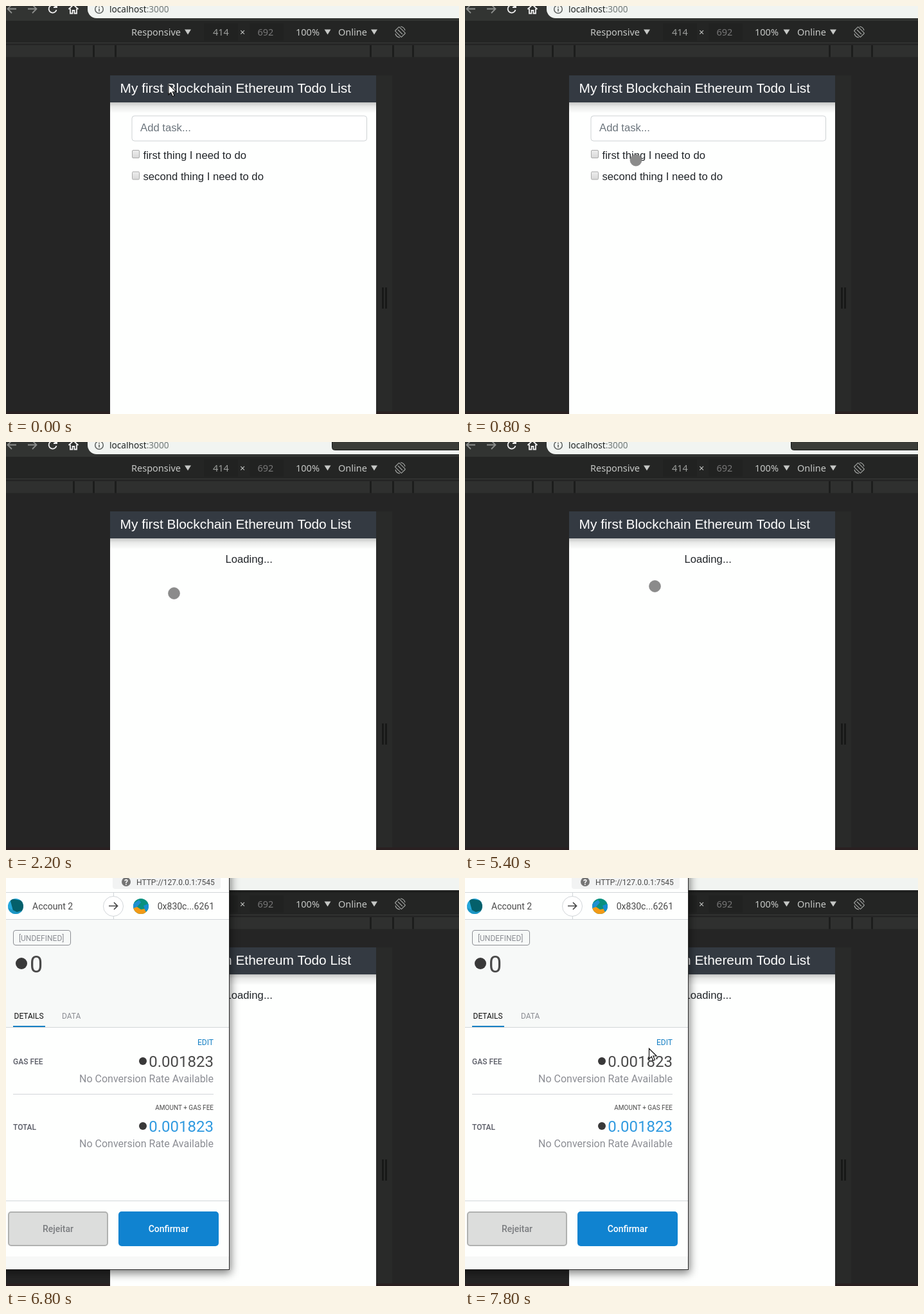
Recreate the animation shown at these times as an HTML page. Size 705 px wide and 635 px high, loop 8 s.

```html
<!DOCTYPE html>
<html lang="en">
<head>
<meta charset="utf-8">
<title>Todo list</title>
<style>
  html, body { margin: 0; width: 100%; height: 100%; overflow: hidden; background: #252525; }
  svg { display: block; }
  .page { font: 16.7px "Liberation Sans", Arial, sans-serif; fill: #212529; }
  .tools { font: 14.5px "Noto Sans", "Open Sans", sans-serif; fill: #c6c8c6; }
  .wallet { font: 12px Roboto, sans-serif; fill: #4a4a4a; }
  .wallet .end { text-anchor: end; }
  .medium { font-weight: 500; }
  .sum { font-size: 24px; }
  .note { font-size: 16px; fill: #8c8e94; }
  .line { fill: none; stroke: #d2d6d9; }
</style>
</head>
<body>
<svg width="705" height="635" viewBox="0 0 705 635">
  <defs>
    <linearGradient id="shade" x2="0" y2="1">
      <stop stop-color="#000" stop-opacity=".22"/>
      <stop offset=".4" stop-color="#000" stop-opacity=".08"/>
      <stop offset="1" stop-color="#000" stop-opacity="0"/>
    </linearGradient>
    <linearGradient id="box" x2="0" y2="1">
      <stop stop-color="#eee"/><stop offset="1" stop-color="#d8d8d8"/>
    </linearGradient>
    <filter id="blur" x="-20%" y="-20%" width="140%" height="140%"><feGaussianBlur stdDeviation="7"/></filter>
    <clipPath id="face"><circle r="12"/></clipPath>
    <rect id="check" x=".5" y=".5" width="11" height="12" rx="1.5" fill="url(#box)" stroke="#aaa"/>
    <path id="down" d="M0 0h10l-5 8z" fill="#c6c8c6"/>
  </defs>

  <!-- browser bar -->
  <rect width="705" height="23" fill="#323432"/>
  <path d="M705 19H141a14 14 0 0 1-14-14V0H705z" fill="#f1f4f1"/>
  <g fill="none" stroke-width="1.8">
    <path d="M16 4.5H3M9-2L2.5 4.5 9 11M34 4.5H47M41-2l6.500 6.500L41 11" stroke="#8b8d8b"/>
    <path d="M77.500 1A6 6 0 1 0 78.500 6M79-3v5h-5" stroke="#f2f2f2"/>
    <path d="M97.500 5L105-2l7.500 7M100 4v7.500h3.500V7h3v4.500h3.500V4" stroke="#f2f2f2"/>
    <circle cx="145" cy="5" r="6.300" stroke="#5b5f5d" stroke-width="1.500"/>
    <path d="M145 4v4.500M145 1v1.700" stroke="#5b5f5d" stroke-width="1.600"/>
  </g>
  <text class="tools" x="161" y="10" style="font-size:13.650px;fill:#202422">localhost<tspan fill="#747b78">:3000</tspan></text>

  <!-- device toolbar -->
  <rect y="23" width="705" height="35" fill="#242524"/>
  <path d="M308 27h53v27h-53zM379 27h53v27h-53z" fill="#212221"/>
  <path d="M0 57.500H705" stroke="#3a3b3a"/>
  <g class="tools">
    <text x="195" y="46">Responsive</text>
    <text x="322" y="46" fill="#9a9c9a">414</text>
    <text x="364" y="46">×</text>
    <text x="391.500" y="46" style="fill:#777">692</text>
    <text x="451" y="46">100%</text>
    <text x="517" y="46">Online</text>
  </g>
  <use href="#down" x="278" y="36.500"/><use href="#down" x="495.500" y="36.500"/><use href="#down" x="568" y="36.500"/>
  <g fill="none" stroke="#a2a4a2" stroke-width="1.200">
    <rect x="-4.500" y="-7" width="9" height="14" rx="1" transform="translate(613.500 40.500) rotate(-45)"/>
    <path d="M606 43a8 8 0 0 0 7 6M621 38a8 8 0 0 0-7-6M610 37l7 7"/>
  </g>
  <rect y="61" width="705" height="18.500" fill="#2f302f"/>
  <path d="M105.500 61v18.500m31-18.500v18.500m34-18.500v18.500m397-18.500v18.500m35-18.500v18.500m31-18.500v18.500" stroke="#1c1d1c" stroke-width="3"/>
  <rect x="576" y="108" width="25" height="527" fill="#292a29"/>
  <path d="M586.500 438v33m5-33v33" stroke="#151615" stroke-width="2.500"/>
  <path d="M0 633H705" stroke="#2a2021" stroke-width="4"/>

  <!-- web page -->
  <rect x="162" y="108" width="414" height="527" fill="#fefffe"/>
  <rect x="162" y="150" width="414" height="17" fill="url(#shade)"/>
  <rect x="162" y="108" width="414" height="42" fill="#343a42"/>
  <g class="page">
    <text x="177.500" y="135" style="font-size:20.900px;fill:#fff">My first Blockchain Ethereum Todo List</text>
    <g id="todos">
      <rect x="196" y="171" width="365.500" height="39" rx="4" fill="#fff" stroke="#ced2d4"/>
      <text x="209" y="195" fill="#6c757d">Add task...</text>
      <use href="#check" x="196" y="224"/><text x="213.500" y="238">first thing I need to do</text>
      <use href="#check" x="196" y="257.500"/><text x="213.500" y="271">second thing I need to do</text>
    </g>
    <text id="loading" x="341.500" y="188">Loading...</text>
  </g>

  <path id="opening" d="M705 12.500H511.500a4 4 0 0 1-4-4V-2H705z" fill="#3b3c37" stroke="#151615"/>

  <!-- wallet window -->
  <g id="wallet" class="wallet">
    <rect x="348" y="19" width="357" height="4" fill="#1f201f"/>
    <rect x="-20" y="-20" width="370" height="635" fill="#000" opacity=".5" filter="url(#blur)"/>
    <rect x="-1" y="-1" width="348.500" height="610.500" fill="#fefffe" stroke="#2a2a2a"/>
    <path d="M166-1h168v14a4 4 0 0 1-4 4H170a4 4 0 0 1-4-4z" fill="#f2f3f3"/>
    <circle cx="187" cy="6" r="7" fill="#757575"/>
    <text x="187" y="10.500" text-anchor="middle" style="font-weight:700;fill:#fff">?</text>
    <text x="203" y="11">HTTP://127.0.0.1:7545</text>
    <rect y="65" width="347" height="168" fill="#f7f9f8"/>
    <rect y="589" width="347" height="20" fill="#f7f8f7"/>
    <path class="line" d="M0 22.500H347M0 64.500H347M0 232.500H347M11 336.500H323M0 502.500H347M167.500 22V65"/>
    <circle cx="167" cy="44" r="15.500" fill="#fff" stroke="#d2d6d9"/>
    <path d="M160 43.500h13.500m-5.500-5.500l5.500 5.500-5.500 5.500" fill="none" stroke="#444" stroke-width="1.700"/>
    <g transform="translate(15 44)"><g clip-path="url(#face)">
      <rect x="-12" y="-12" width="24" height="24" fill="#25a8dc"/>
      <path d="M-9-12L15-8V8L2 10-4 7z" fill="#04606b"/>
      <path d="M-12 2L2 9l7-2v6h-21z" fill="#1c96c4"/>
    </g></g>
    <g transform="translate(210 44)"><g clip-path="url(#face)">
      <rect x="-12" y="-12" width="24" height="24" fill="#07907f"/>
      <path d="M-12-4l9-6 3 4-7 8-5 2z" fill="#1f8fd2"/>
      <path d="M-12 3L-6 1l6 4 6-1 4 9h-22z" fill="#f29a16"/>
      <path d="M4-1l8-3v9l-5 3z" fill="#168cd0"/>
    </g></g>
    <text x="41" y="49" style="font-size:14px">Account 2</text>
    <text class="end" x="324" y="49" style="font-size:14px">0x830c...6261</text>

    <rect x="11.500" y="81.500" width="89" height="23" rx="3.500" fill="none" stroke="#8c8e94"/>
    <text x="20" y="98" fill="#8c8e94">[UNDEFINED]</text>
    <g fill="#393939">
      <circle cx="24" cy="133" r="9"/><circle cx="213" cy="285" r="6"/><circle cx="213" cy="386" r="6"/>
    </g>
    <text x="37" y="147" style="font-size:36px">0</text>
    <text x="12.500" y="219" fill="#111">DETAILS</text>
    <text x="87" y="219" fill="#8c8e94">DATA</text>
    <rect x="11" y="230" width="50" height="2" fill="#1680c4"/>

    <text class="end" x="323" y="260" fill="#1680c4">EDIT</text>
    <text class="medium" x="11" y="290" fill="#5b5d67">GAS FEE</text>
    <text class="end sum" x="323" y="294">0.001823</text>
    <text class="end note" x="323" y="318">No Conversion Rate Available</text>
    <text class="end" x="323" y="361" style="font-size:10px">AMOUNT + GAS FEE</text>
    <text class="medium" x="11" y="392" fill="#5b5d67">TOTAL</text>
    <text class="end sum" x="323" y="395" fill="#2f9ae0">0.001823</text>
    <text class="end note" x="323" y="419">No Conversion Rate Available</text>

    <rect x="4" y="520" width="154" height="52" rx="4" fill="#dcdddc" stroke="#b0b1b0" stroke-width="2"/>
    <rect x="175" y="519" width="156" height="54" rx="5" fill="#1083d0"/>
    <g class="medium" text-anchor="middle" style="font-size:14px">
      <text x="81" y="551" fill="#7b7d80">Rejeitar</text>
      <text x="253" y="551" fill="#fff">Confirmar</text>
    </g>
  </g>

  <circle id="touch" r="9" fill="#8b8b8b" stroke="#7d7d7d" stroke-width=".6"/>
  <path id="arrow" d="M.5.5v16l3.700-3.500 2.600 6.200 2.700-1.200-2.600-6h5.200z" fill="#fff" stroke="#111" stroke-width="1.200"/>
</svg>
<script>
  const LOOP = 8000, STEP = 100;

  // Pointer stops: [time, shape, x, y]; each holds until the next.
  const pointer = [
    [0, "arrow", 252.5, 121.5],
    [100, "touch", 256, 165], [200, "touch", 270, 215], [300, "touch", 283, 245],
    [400, "touch", 275, 259], [500, "touch", 255, 255], [600, "touch", 241, 245],
    [700, "touch", 252, 240], [800, "touch", 266, 240], [900, "touch", 257, 237],
    [1000, "touch", 249, 240], [1200, "touch", 263, 234], [1300, "touch", 261.5, 235.5],
    [5400, "touch", 295.5, 224.5], [5500, "touch", 303, 222],
    [5600, "touch", 305, 224], [5700, "touch", 304.5, 225.5],
    [6000, "touch", 400, 175], [6100, "arrow", 667, 35], [6200, "none"],
    [7300, "arrow", 655, 37], [7400, "touch", 555, 115], [7500, "touch", 430, 205],
    [7600, "arrow", 325, 255], [7700, "arrow", 290, 272], [7800, "arrow", 286, 265]
  ];

  const el = id => document.getElementById(id);
  const show = (id, visible) => el(id).style.display = visible ? "" : "none";

  function render(t) {
    const [, shape, x, y] = pointer.findLast(stop => stop[0] <= t);
    for (const id of ["touch", "arrow"]) {
      show(id, id === shape);
      if (id === shape) el(id).setAttribute("transform", `translate(${x} ${y})`);
    }
    show("todos", t < 1900);
    show("loading", t >= 1900);
    show("opening", t >= 2000 && t < 6800);
    el("opening").style.opacity = Math.min(1, (t - 1900) / 300);
    show("wallet", t >= 6800);
  }

  const start = performance.now();
  function tick() {
    const t = (performance.now() - start) % LOOP;
    render(Math.floor(t / STEP) * STEP);
    requestAnimationFrame(tick);
  }
  tick();
</script>
</body>
</html>
```
